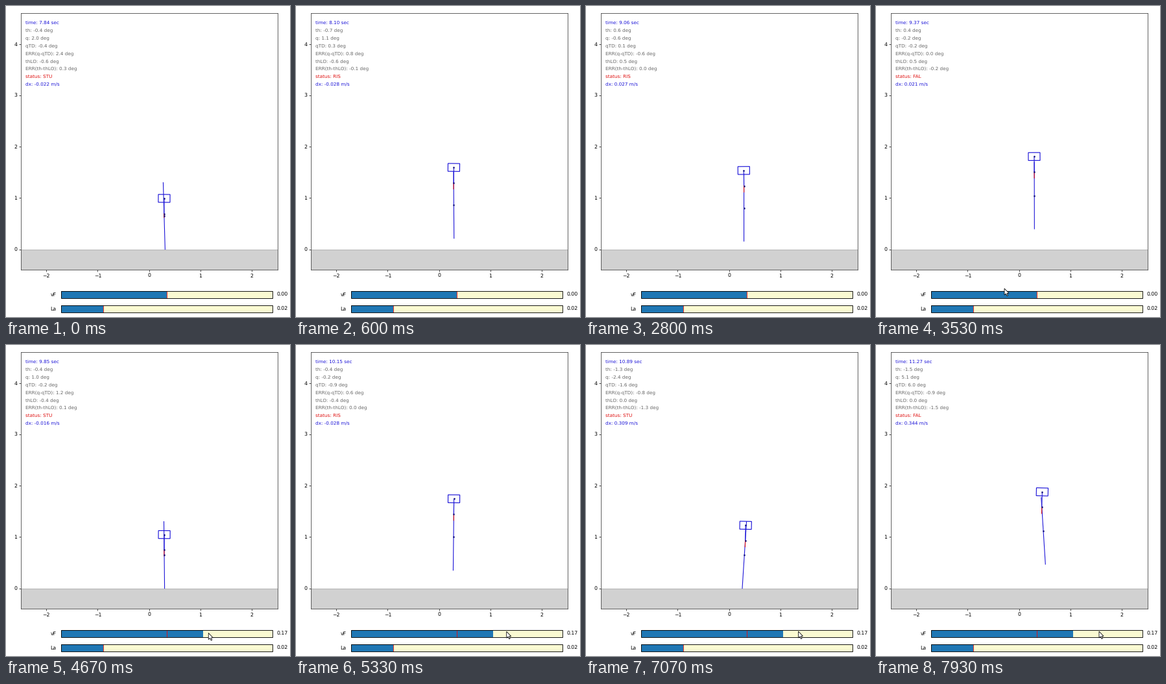
Animation, 438 px wide and 480 px high, one loop 8000 ms. Source, as a matplotlib script:

```python
import numpy as np
import matplotlib.pyplot as plt
from matplotlib.animation import FuncAnimation
from matplotlib.patches import Polygon, Rectangle

plt.rcParams["text.hinting"] = "none"

W, H, DPI = 438, 480, 64
PX = 72 / DPI                  # points per pixel
FRAMES, STEP = 200, 40
CLOCK_START, CLOCK_RATE = 7.84, 0.4325   # simulated seconds per real second

G = 9.81
FIRST_APEX, PERIOD, APEX = 7.345, 0.9775, 1.83
L_RISE, L_FALL = 1.37, 1.41    # body height over foot at lift-off / touch-down
SQUAT, HIP, ROD = 0.40, 0.30, 1.30
PUSH_T, PUSH_W, PUSH_V = 10.76, 0.05, 0.316
CLICK, MOUSE_IN = 4.2, 3.52    # real seconds

BLUE, RED, GREY = "#1c14d8", "#e01010", "#666666"

# leg angle and its goal: a few points, joined by straight lines
LEG_T = [7.84, 8.10, 8.73, 9.35, 9.84, 10.49, 10.94, 11.27]
LEG_Q = [2.0, 1.1, -0.9, -0.26, 1.0, -1.58, -2.5, 5.1]
LEG_GOAL = [-0.4, 0.3, 0.4, -0.22, -0.2, -1.6, -1.6, 6.0]

MOUSE_T = [3.53, 4.2, 5.4, 7.0, 7.6]
MOUSE_X = [198, 304, 326, 326, 344]
MOUSE_Y = [436, 446, 442, 442, 442]


def push(t):
    """Forward drive after the vF slider moves, 0 to 1."""
    return 1 / (1 + np.exp(-(t - PUSH_T) / PUSH_W))


def sway(t):
    return 0.72 * np.exp(-0.25 * (t - 8.1)) * np.sin(2 * np.pi * (t - 8.64) / 1.9)


def drift(t):
    """Forward position and speed of the body."""
    w = 2 * np.pi / 2.1
    phase = w * (t - 8.6)
    x = 0.289 - 0.028 / w * np.cos(phase)
    x += PUSH_V * PUSH_W * np.log1p(np.exp((t - PUSH_T) / PUSH_W))
    return x, 0.028 * np.sin(phase) + PUSH_V * push(t)


apex_t = FIRST_APEX + PERIOD * np.arange(5)
apex_y = APEX + 0.05 * push(apex_t)
land_t = apex_t + np.sqrt(2 * (apex_y - L_FALL) / G)
lift_t = apex_t - np.sqrt(2 * (apex_y - L_RISE) / G)


def hop_state(t):
    """Body height, foot height, status and next lift-off time."""
    hop = max(np.searchsorted(land_t, t, side="right") - 1, 0)
    land, lift, top = land_t[hop], lift_t[hop + 1], apex_t[hop + 1]
    if land <= t < lift:
        u = (t - land) / (lift - land)
        y = L_FALL + (L_RISE - L_FALL) * u - SQUAT * np.sin(np.pi * u)
        return y, 0.0, "SQD" if u < 0.5 else "STU", lift
    y = apex_y[hop + 1] - G * (t - top) ** 2 / 2
    rise = np.clip((t - lift) / (top - lift), 0, 1)
    foot = max(y - L_RISE - (L_FALL - L_RISE) * rise, 0.0)
    return y, foot, "RIS" if t < top else "FAL", lift


fig = plt.figure(figsize=(W / DPI, H / DPI), dpi=DPI, facecolor="white")


def px_axes(left, top, width, height):
    return fig.add_axes([left / W, 1 - (top + height) / H, width / W, height / H])


# world
ax = px_axes(22.6, 11.2, 396, 396)
ax.set(xlim=(-2.5, 2.5), ylim=(-0.4, 4.6), xticks=range(-2, 3), yticks=range(5))
ax.tick_params(labelsize=7.7 * PX, length=2.6 * PX, width=0.7 * PX, pad=2.9 * PX)
for spine in ax.spines.values():
    spine.set(linewidth=0.8 * PX, edgecolor="#3c3c3c")
ax.add_patch(Rectangle((-2.5, -0.4), 5, 0.4, fc="#d1d1d1", ec="none", zorder=0.5))
ax.plot([-2.5, 2.5], [0, 0], color="#b0b0b0", lw=0.9 * PX, zorder=0.6)


def stroke(color, z):
    return ax.plot([], [], color=color, lw=1.1 * PX, zorder=z,
                   solid_capstyle="projecting")[0]


rod, hip, spring = stroke(BLUE, 3), stroke(BLUE, 3), stroke(RED, 4)
box = ax.add_patch(Polygon(np.zeros((4, 2)), fc="none", ec=BLUE, lw=1.15 * PX, zorder=3))
dots = ax.plot([], [], "o", ms=2.6 * PX, color="#10107c", mew=0, zorder=5)[0]

# overlay in pixels, y down
ui = px_axes(0, 0, W, H)
ui.set(xlim=(0, W), ylim=(H, 0))
ui.axis("off")


def label(x, y, text, size=7.2, color="black", ha="left"):
    return ui.text(x, y, text, fontsize=size * PX, color=color, ha=ha, va="baseline")


BAR_X, BAR_W, BAR_H = 85, 326, 11


def slider(top, name, value, part):
    def bar(width, z, **style):
        return ui.add_patch(Rectangle((BAR_X, top), width, BAR_H, zorder=z, **style))

    mark = BAR_X + BAR_W * part
    bar(BAR_W, 1, fc="lightgoldenrodyellow", ec="none")
    fill = bar(BAR_W * part, 2, fc="#1f77b4", ec="none")
    bar(BAR_W, 4, fc="none", ec="black", lw=0.9 * PX)
    ui.plot([mark, mark], [top, top + BAR_H], color="red", lw=0.8 * PX, zorder=3)
    label(77.5, top + 8.2, name, 7.7, ha="right")
    return fill, label(417.3, top + 8.2, value, 7.7)


vf_fill, vf_text = slider(440, "vF", "0.00", 0.5)
slider(462, "La", "0.02", 0.2)

colors = [BLUE] + [GREY] * 6 + [RED, BLUE]
lines = [label(30.3, 27.6 + 11.9 * k, "", color=c) for k, c in enumerate(colors)]

ARROW = np.array([[0, 0], [0, 10], [2.3, 8], [4, 11.5], [5.5, 10.8], [4, 7.5], [7, 7.3]])
cursor = ui.add_patch(Polygon(ARROW, fc="white", ec="black", lw=0.8 * PX, zorder=9))


def down(degrees):
    a = np.radians(degrees)
    return np.array([np.sin(a), -np.cos(a)])


def draw_robot(x, y, foot_y, th, q):
    body, axis, leg = np.array([x, y]), down(th), down(th + q)
    knee = body + HIP * axis
    foot = knee + leg * (knee[1] - foot_y) / -leg[1]
    mid = foot - leg * ROD / 2
    tip = knee + axis * np.clip(knee[1] - mid[1] + 0.02, 0.07, 0.12)
    for line, pts in ((rod, [foot, foot - leg * ROD]), (hip, [body, knee]),
                      (spring, [knee, tip]), (dots, [body, knee, mid])):
        line.set_data(*np.transpose(pts))
    side = np.array([-axis[1], axis[0]])
    box.set_xy([body + a * 0.114 * side + b * 0.077 * axis
                for a, b in ((-1, -1), (1, -1), (1, 1), (-1, 1))])


def draw(i):
    now = (i * STEP + 10) / 1000
    t = CLOCK_START + CLOCK_RATE * now
    y, foot_y, status, lift = hop_state(t)
    x, dx = drift(t)
    th = sway(t) - 1.7 * push(t)
    th_lo = sway(lift) * (1 - push(lift))
    q, goal = np.interp(t, LEG_T, LEG_Q), np.interp(t, LEG_T, LEG_GOAL)
    draw_robot(x, y, foot_y, th, q)

    angles = {"th": th, "q": q, "qTD": goal, "ERR(q-qTD)": q - goal,
              "thLO": th_lo, "ERR(th-thLO)": th - th_lo}
    texts = [f"time: {t:.2f} sec"]
    texts += [f"{name}: {angle:.1f} deg" for name, angle in angles.items()]
    texts += [f"status: {status}", f"dx: {dx:.3f} m/s"]
    for line, text in zip(lines, texts):
        line.set_text(text)

    vf = 0.173 if now >= CLICK else 0.0
    vf_fill.set_width(BAR_W * (0.5 + vf))
    vf_text.set_text(f"{vf:.2f}")

    cursor.set_visible(now >= MOUSE_IN)
    cursor.set_xy(ARROW + [np.interp(now, MOUSE_T, MOUSE_X),
                           np.interp(now, MOUSE_T, MOUSE_Y)])
    return []


anim = FuncAnimation(fig, draw, frames=FRAMES, init_func=lambda: draw(0),
                     interval=STEP, repeat=True, repeat_delay=0)
plt.show()
```
